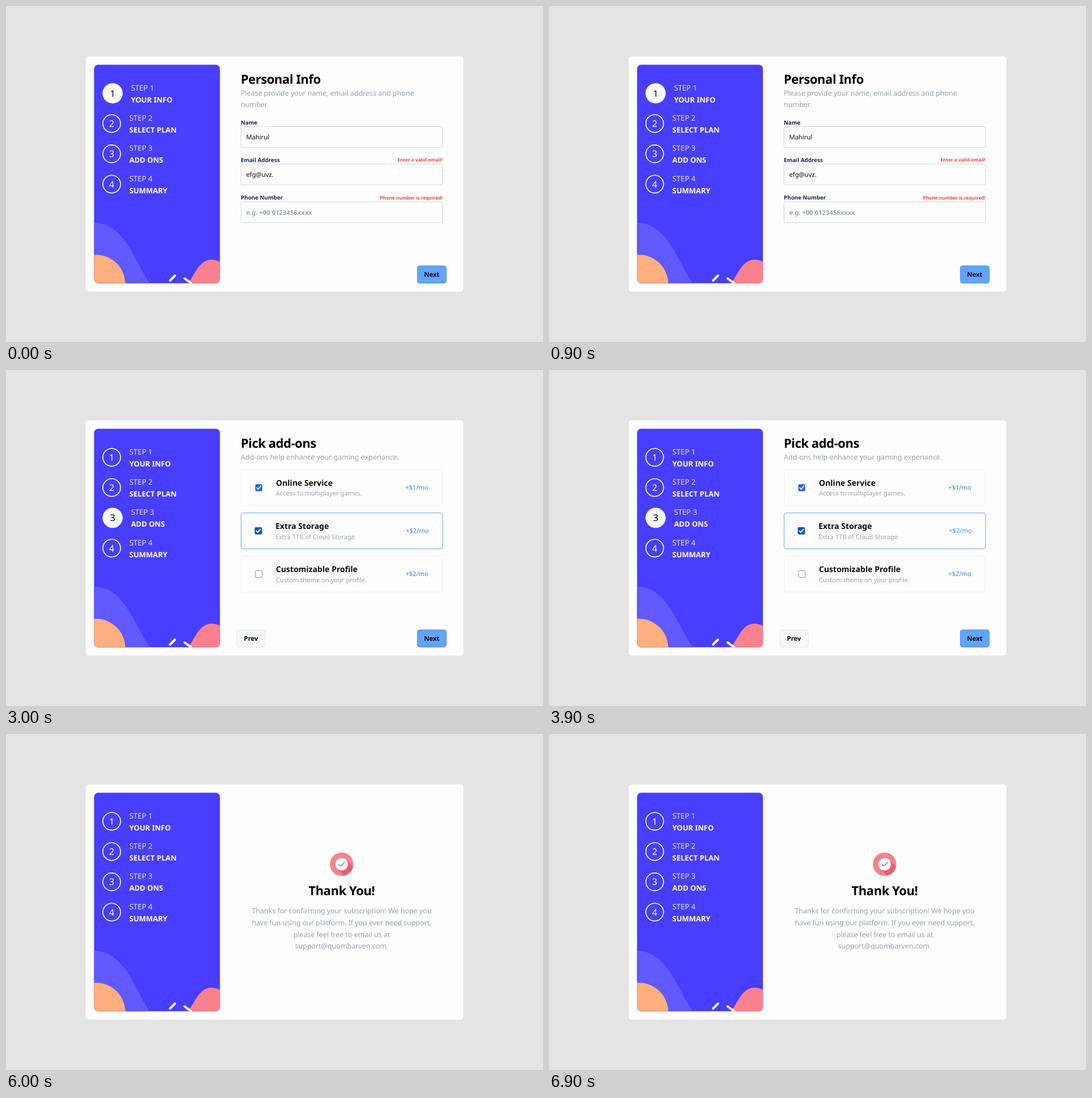
Animation of 947x592 px, one loop 7.5 s. Source, as an HTML page:

```html
<!DOCTYPE html>
<html lang="en">
<head>
<meta charset="utf-8">
<title>Multi-step form</title>
<style>
html, body { margin: 0; width: 100%; height: 100%; overflow: hidden; background: #e4e4e4; }
svg { display: block; }
text { font-family: "Noto Sans", "Open Sans", sans-serif; text-rendering: geometricPrecision; white-space: pre; }

.title { font-size: 22px; font-weight: 700; letter-spacing: -.45px; fill: #000; }
.lead { font-size: 12.7px; letter-spacing: -.13px; fill: #9ca3af; }
.step { font-size: 13.2px; font-weight: 300; fill: #e4e3ff; }
.step-name { font-size: 13px; font-weight: 600; fill: #fff; }
.digit { font-size: 16px; font-weight: 500; fill: #fff; }
.label { font-size: 9.85px; font-weight: 600; fill: #172554; }
.error { font-size: 8.35px; font-weight: 600; fill: #ef4444; }
.value { font-size: 11.3px; fill: #111; }
.hint { font-size: 11.25px; font-weight: 600; fill: #9ca3af; }
.button { font-size: 11.3px; font-weight: 600; fill: #000; }
.name { font-size: 14px; font-weight: 600; fill: #0a0a0a; }
.note { font-size: 11.15px; fill: #9ca3af; }
.price { font-size: 11.1px; fill: #3b82f6; }
.strong { font-size: 11.2px; font-weight: 600; fill: #0a0a0a; }
.small { font-size: 9.85px; fill: #6b7280; }
.small-strong { font-size: 9.8px; font-weight: 600; fill: #1f2937; }
.link { font-size: 9.6px; fill: #111; }
.end { text-anchor: end; }
.mid { text-anchor: middle; }

.on, .off { animation: 7.5s step-end calc(var(--i) * 1.5s - 7.5s) infinite; }
.on { animation-name: show; }
.off { animation-name: hide; }
@keyframes show { 0% { visibility: visible; } 20%, 100% { visibility: hidden; } }
@keyframes hide { 0% { visibility: hidden; } 20%, 100% { visibility: visible; } }
</style>
</head>
<body>
<svg id="stage" width="947" height="592" viewBox="0 0 947 592"></svg>
<script>
const text = (x, y, cls, str, extra = '') =>
  `<text x="${x}" y="${y}" class="${cls}" ${extra}>${str}</text>`;
const box = (x, y, w, h, r, fill, stroke = 'none') =>
  `<rect x="${x}" y="${y}" width="${w}" height="${h}" rx="${r}" fill="${fill}" stroke="${stroke}"/>`;
const disc = (x, y, r, fill, extra = '') =>
  `<circle cx="${x}" cy="${y}" r="${r}" fill="${fill}" ${extra}/>`;
const path = (d, fill, extra = '') => `<path d="${d}" fill="${fill}" ${extra}/>`;
const line = (d, color, width) =>
  path(d, 'none', `stroke="${color}" stroke-width="${width}" stroke-linecap="round" stroke-linejoin="round"`);
const timed = (cls, i, body) => `<g class="${cls}" style="--i:${i}">${body}</g>`;

const head = (title, ...lead) => text(414, 137, 'title', title) +
  lead.map((str, i) => text(414, 157.7 + i * 20.6, 'lead', str)).join('');

const prev = box(407, 457.8, 50, 30.4, 4, '#f6f7f8', '#e5e7eb') + text(432, 477, 'button mid', 'Prev');
const next = box(725.4, 457.8, 51, 30.4, 4, '#60a5fa', '#4a90ec') + text(750.8, 477, 'button mid', 'Next');
const subscribe = box(698.5, 457.8, 78, 30.4, 4, '#4ade80', '#35c96c') + text(737.4, 477, 'button mid', 'Subscribe');

function step(name, i) {
  const y = 153.8 + i * 53.35;
  const labels = x => text(x, y - 5.1, 'step', 'STEP ' + (i + 1)) + text(x, y + 15.8, 'step-name', name);
  const idle = disc(186.4, y, 15.6, 'none', 'stroke="#fff" stroke-width="1.6"') +
    text(186.4, y + 5.8, 'digit mid', i + 1) + labels(217.5);
  const active = disc(188, y, 17.8, '#f9fafb') +
    text(188, y + 5.8, 'digit mid', i + 1, 'style="fill:#000"') + labels(220.4);
  return timed('off', i, idle) + timed('on', i, active);
}

const sidebar = `<clipPath id="side">${box(155.3, 103.6, 222, 385, 7, '#000')}</clipPath>
  <g clip-path="url(#side)">` +
  box(155, 103, 223, 386, 0, '#483eff') +
  path('M155 382.4C183 380 205 403 222 433C232 451 242 472 254 489H155Z', '#6259ff') +
  disc(158.5, 490, 51.8, '#ffaf7e') +
  path('M321 489C333 473 341 447 362 447C368 447 373 448.500 378 451V489Z', '#f9818e') +
  line('M289.500 483.700L297.800 475.200M315 480L326.500 488.500', '#fff', 4) + '</g>' +
  ['YOUR INFO', 'SELECT PLAN', 'ADD ONS', 'SUMMARY'].map(step).join('');

function field(y, label, cls, value, error = '') {
  return text(414, y - 3.7, 'label', label) + text(770, y - 4.2, 'error end', error) +
    box(414.5, y, 355.3, 36.6, 1.5, '#fdfdfd', '#d1d5db') + text(423.4, y + 22.7, cls, value);
}

const info = head('Personal Info', 'Please provide your name, email address and phone', 'number.') +
  field(212.5, 'Name', 'value', 'Mahirul') +
  field(278.5, 'Email Address', 'value', 'efg@uvz.', 'Enter a valid email!') +
  field(345.1, 'Phone Number', 'hint', 'e.g. +00 0123456xxxx', 'Phone number is required!') + next;

// Plan cards are drawn around their centre so the chosen one can be scaled.
function plan(x, name, price, color, icon, scale = 1) {
  return `<g transform="translate(${x} 258.200) scale(${scale})">` +
    box(-53, -65.3, 106, 130.6, 4, '#f5f8f7', scale > 1 ? '#60a5fa' : 'none') +
    disc(-26, -38.4, 14.9, color) + `<g transform="translate(-26 -38.400)">${icon}</g>` +
    text(-41, 30.3, 'name', name, 'style="font-size:14.2px"') +
    text(-41, 48.8, 'note', price, 'style="font-size:11.5px"') + '</g>';
}

const joystick = disc(0, -5.2, 2.3, '#fff') + line('M0 -4V0', '#fff', 1.6) +
  path('M-4.500 -.5H-1.800V2H1.800V-.5H4.500V8H-4.500Z', '#fff') + disc(-1.6, 5, .8, '#ffaf7e');
const controller = box(-7.5, -4, 15, 8, 4, '#fff') +
  line('M-5 0H-2M-3.500 -1.500V1.500', '#f9818e', .9) + disc(2.5, 0, 1, '#f9818e') + disc(5, 0, 1, '#f9818e');
const gamepad = path('M-5 -5.500H5C7 -5.500 7.800 3 7.300 5C6.700 7 4.800 6 3 2.800H-3C-4.800 6 -6.700 7 -7.300 5C-7.800 3 -7 -5.500 -5 -5.500Z', '#fff') +
  line('M-4.800 -1.500H-1.800M-3.300 -3V0', '#483eff', .9) + disc(2.2, -1.5, .9, '#483eff') + disc(4.6, -1.5, .9, '#483eff');

const plans = head('Select Your Plan', 'You have the option to select monthly or yearly billing.') +
  plan(473.5, 'Arcade', '9$', '#ffaf7e', joystick) +
  plan(591.9, 'Advanced', '12$', '#f9818e', controller, 1.05) +
  plan(710.5, 'Pro', '15$', '#483eff', gamepad) +
  text(527, 361, 'strong', 'Monthly', 'style="font-weight:700"') +
  box(583.4, 347.9, 32.2, 17.7, 8.8, '#e5e5e5') + disc(592.2, 356.7, 7.2, '#fff') +
  text(624.2, 361, 'value', 'Yearly', 'style="font-size:11.5px"') + prev + next;

function addon(y, name, note, price, check, chosen) {
  const x = chosen ? 414.6 : 415.2, w = chosen ? 355.3 : 354;
  const cx = chosen ? 445 : 445.7, s = chosen ? 12.8 : 12.2;
  return box(x, y - 31.6, w, 63.2, 4, '#fdfdfd', chosen ? '#60a5fa' : '#f0f1f4') +
    box(cx - s / 2, y - s / 2, s, s, 2, check || '#fff', check ? 'none' : '#8a8a8a') +
    (check ? line(`M${cx - 3.4} ${y + .3}l2.300 2.400l4.700 -5.400`, '#fff', 1.9) : '') +
    text(chosen ? 475.2 : 476, y - 3.6, 'name', name) +
    text(chosen ? 475.2 : 476, y + 14.1, 'note', note) +
    text(chosen ? 745.5 : 744.6, y + 3.8, 'price end', price);
}

const addons = head('Pick add-ons', 'Add-ons help enhance your gaming experiance.') +
  addon(207.3, 'Online Service', 'Access to multiplayer games.', '+$1/mo', '#2563eb') +
  addon(283.4, 'Extra Storage', 'Extra 1TB of Cloud Storage.', '+$2/mo', '#1a50c8', true) +
  addon(359.6, 'Customizable Profile', 'Custom theme on your profile.', '+$2/mo') + prev + next;

const row = (y, left, leftCls, right, rightCls, extra) =>
  text(425.8, y, leftCls, left) + text(758, y, rightCls + ' end', right, extra);

const summary = head('Finishing Up', 'Double check everything looks OK before Confirming.') +
  box(414.4, 178, 355.6, 116.5, 2, '#f8f9fb') + box(414.4, 233.6, 355.6, 1, 0, '#e5e7eb') +
  text(425.8, 202, 'strong', 'Advanced(Monthly)') + text(758, 209.3, 'strong end', '$12/mo') +
  text(425.8, 217.6, 'link', 'chnage') + box(425.8, 218.9, 33.2, .8, 0, '#111') +
  row(256.8, 'Online Service', 'small', '+$1/mo', 'small-strong') +
  row(277.4, 'Extra Storage', 'small', '+$2/mo', 'small-strong') +
  row(318.4, 'Total cost (per month)', 'small', '+$15/mo', 'strong', 'style="fill:#2563eb"') + prev + subscribe;

const thanks = `<clipPath id="badge">${disc(591.9, 229.4, 20.7, '#000')}</clipPath>` +
  disc(591.9, 229.4, 20.7, '#f9818e') +
  path('M599.700 221.600L620 242L604 258L584.100 237.200Z', '#e95f6e', 'clip-path="url(#badge)"') +
  disc(591.9, 229.4, 11, '#fff') + line('M587 229.500L590.400 232.700L597 226.400', '#e95f6e', 1.6) +
  text(591.9, 283.5, 'title mid', 'Thank You!') +
  ['Thanks for confirming your subscription! We hope you',
    'have fun using our platform. If you ever need support,',
    'please feel free to email us at',
    'support@quombarven.com.'
  ].map((str, i) => text(591.9, 316.3 + i * 20.65, 'lead mid', str)).join('');

document.getElementById('stage').innerHTML =
  box(140.6, 88.7, 666, 414.5, 5, '#fdfdfd') + sidebar +
  [info, plans, addons, summary, thanks].map((pane, i) => timed('on', i, pane)).join('');
</script>
</body>
</html>
```
